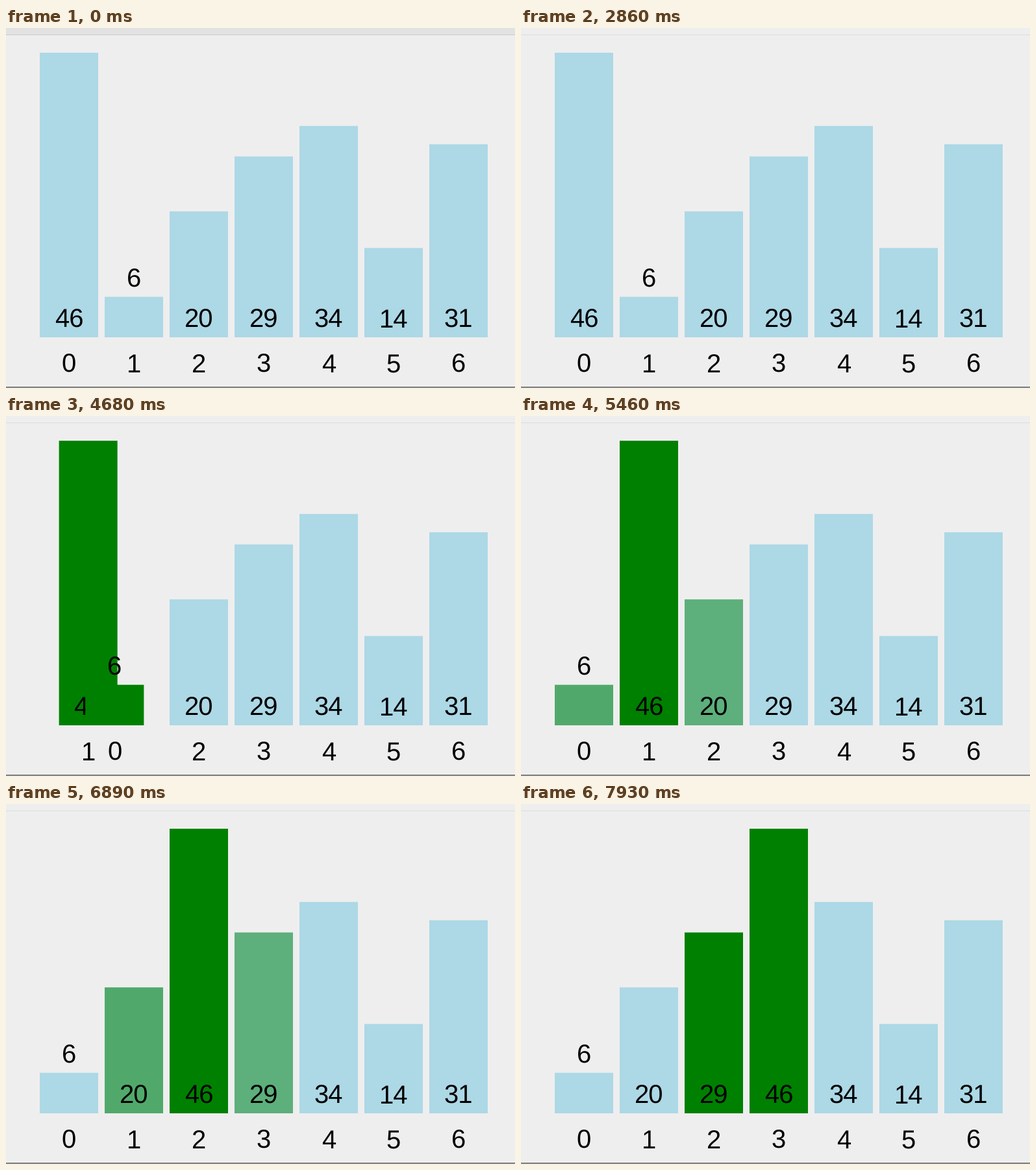
These frames come from a looping animation (784x554 px, 8 s). A matplotlib script:

```python
import matplotlib.pyplot as plt
import numpy as np
from matplotlib.animation import FuncAnimation
from matplotlib.patches import Rectangle

W, H, DPI = 784, 554, 64
LOOP, INTERVAL = 8000, 40
TICK = 130                      # the picture only updates on this beat, in ms

VALUES = [46, 6, 20, 29, 34, 14, 31]
SWAPS = 3                       # the tallest bar moves right this many times
CYCLE = 1430
FADE_START, MOVE_START, EASE_TIME = 3908, 4575, 250
HEADER_START, HEADER_TIME = 14 * TICK, 3 * TICK

LEFT, PITCH, BAR_W, BASE = 52, 100, 90, 476
BLUE = np.array([173, 216, 230]) / 255
GREEN = np.array([0, 128, 0]) / 255

plt.rcParams["font.family"] = "Liberation Sans"
plt.rcParams["text.hinting"] = "none"

fig = plt.figure(figsize=(W / DPI, H / DPI), dpi=DPI, facecolor="#eeeeee")
ax = fig.add_axes([0, 0, 1, 1])
ax.set_xlim(0, W)
ax.set_ylim(H, 0)
ax.axis("off")


def box(x, y, w, h, color, z=0):
    return ax.add_patch(Rectangle((x, y), w, h, facecolor=color,
                                  linewidth=0, snap=False, zorder=z))


def label(y, text, z):
    return ax.text(0, y, text, fontsize=40 * 72 / DPI, color="black",
                   ha="center", va="baseline", zorder=z)


def gray(level):
    return (level / 255,) * 3


def ease(t):
    """Cubic in-out."""
    t = min(max(t, 0), 1)
    return 4 * t ** 3 if t < 0.5 else 1 - 4 * (1 - t) ** 3


header = box(0, 0, W, 10, gray(226))
rule = box(0, 10, W, 1, gray(200))
box(0, 552, W, 1.5, gray(90))

bars, numbers, indices = [], [], []
for i, v in enumerate(VALUES):
    height = 6 + 9.39 * v
    inside = height > 80
    bars.append(box(0, BASE - height, BAR_W, height, BLUE, 2 * i + 1))
    numbers.append(label((BASE if inside else BASE - height) - 15, str(v), 2 * i + 2))
    indices.append(label(530, str(i), 2 * i + 2))


def place(i, slot, index, green):
    x = LEFT + PITCH * slot
    bars[i].set_x(x)
    bars[i].set_facecolor(BLUE + (GREEN - BLUE) * green)
    numbers[i].set_x(x + BAR_W / 2)
    indices[i].set_x(x + BAR_W / 2)
    indices[i].set_text(str(index))


def draw(frame):
    t = (frame * INTERVAL + INTERVAL - 1) // TICK * TICK

    shown = min(max((t - HEADER_START) / HEADER_TIME, 0), 1)
    header.set_facecolor(gray(226 + 12 * shown))
    rule.set_facecolor(gray(200 + 20 * shown))

    fade = [ease((t - FADE_START - c * CYCLE) / EASE_TIME) for c in range(SWAPS + 1)]
    move = [ease((t - MOVE_START - c * CYCLE) / EASE_TIME) for c in range(SWAPS)]

    place(0, sum(move), sum(m > 0 for m in move), fade[0])
    for i in range(1, len(VALUES)):
        if i <= SWAPS:
            m = move[i - 1]
            place(i, i - m, i - (m > 0), fade[i - 1] - fade[i])
        else:
            place(i, i, i, 0)
    return bars + numbers + indices + [header, rule]


anim = FuncAnimation(fig, draw, frames=LOOP // INTERVAL, interval=INTERVAL,
                     repeat=True, repeat_delay=0, blit=False)
plt.show()
```
